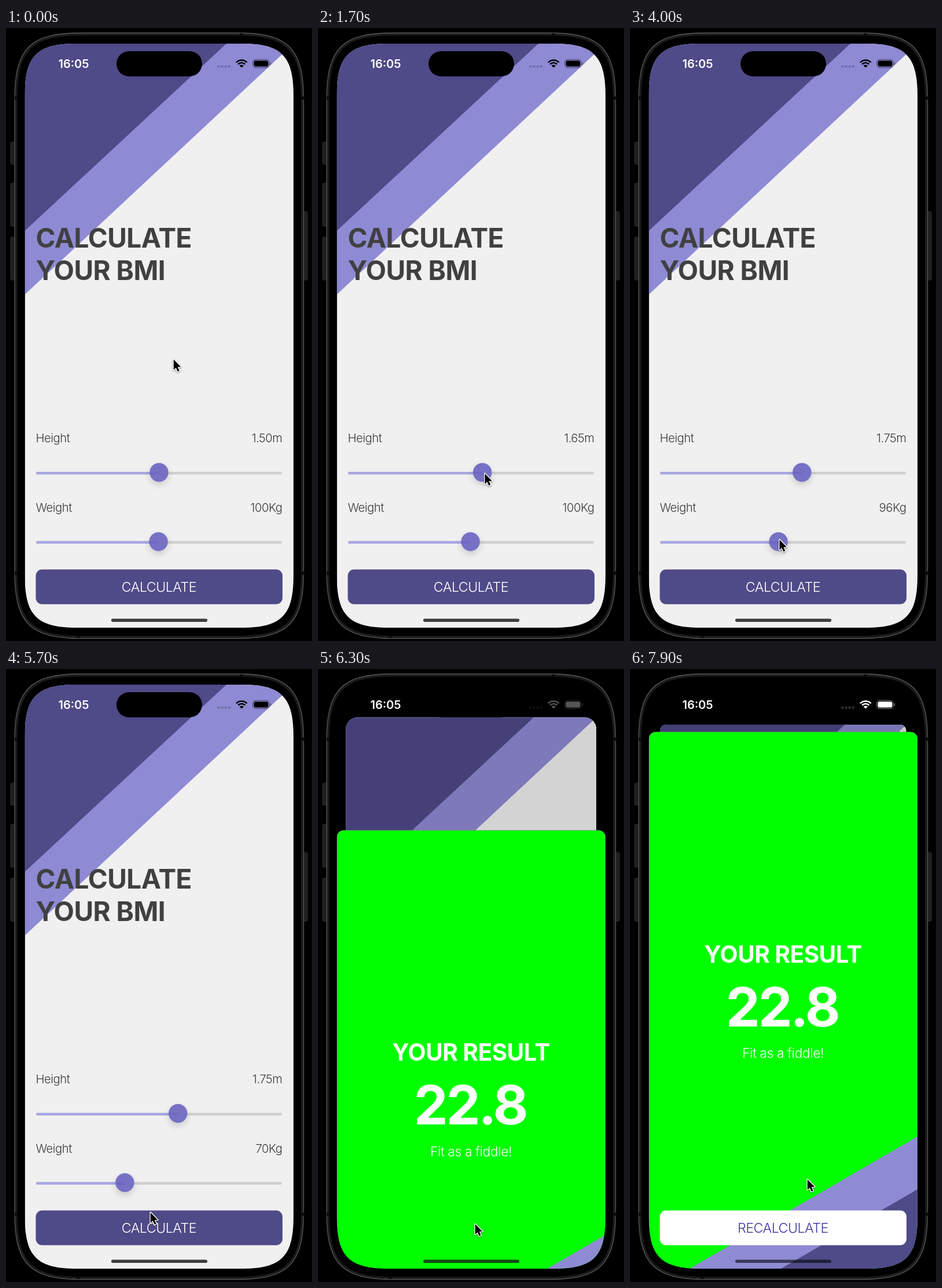
An HTML page with a canvas that plays this animation: 529 by 1058 pixels, repeating every 8 s.

```html
<!DOCTYPE html>
<html lang="en">
<head>
<meta charset="utf-8">
<title>BMI calculator</title>
<style>
html, body { margin: 0; width: 100%; height: 100%; overflow: hidden; background: #000; }
canvas { display: block; width: 100%; height: 100%; }
</style>
</head>
<body>
<canvas id="stage"></canvas>
<script>
const W = 529, H = 1058, LOOP = 8000, STEP = 100;
const MID = 264.7;
const SCREEN = { x: 32.5, y: 27, w: 464.5, h: 1008, r: 65 };
const DARK = '#4f4a88', LILAC = '#8e8ad4', PAPER = '#f0f0f0';
const KNOB_MID = 264.5, KNOB_TRAVEL = 394;

const canvas = document.getElementById('stage');
const ratio = window.devicePixelRatio || 1;
canvas.width = W * ratio;
canvas.height = H * ratio;
const ctx = canvas.getContext('2d');

// Pointer path: time, x, y
const POINTER = [
  [0, 289, 571], [500, 281, 668], [900, 267.9, 767], [1100, 267.9, 768],
  [1700, 287.6, 768], [2300, 294.5, 768], [2900, 298.8, 768], [3100, 300.7, 768],
  [3400, 300.7, 768], [3700, 264.6, 882], [4000, 257.6, 882], [5100, 206.4, 882],
  [5400, 206.4, 882], [5700, 249, 937], [5900, 271, 957], [6900, 271, 957],
  [7200, 277, 919], [7400, 317, 890], [7600, 307, 876], [7800, 307, 879], [7900, 306, 880]
];

const clamp = (v, lo, hi) => Math.min(hi, Math.max(lo, v));
const mix = (a, b, k) => a + (b - a) * k;

function pointerAt(t) {
  const i = POINTER.findIndex(p => p[0] >= t);
  if (i < 0) return POINTER[POINTER.length - 1].slice(1);
  if (i === 0) return POINTER[0].slice(1);
  const a = POINTER[i - 1], b = POINTER[i];
  const k = (t - a[0]) / (b[0] - a[0]);
  return [mix(a[1], b[1], k), mix(a[2], b[2], k)];
}

// Critically damped spring, 0 to 1
function sheetProgress(t) {
  const s = 17 * Math.max(0, t - 6117) / 1000;
  return 1 - (1 + s) * Math.exp(-s);
}

function box(x, y, w, h, r) {
  ctx.beginPath();
  ctx.roundRect(x, y, w, h, r);
}

// Rounded box whose corners ease into the sides
function smoothBox(x, y, w, h, r) {
  const e = r * 1.4, c = e * 0.224, right = x + w, bottom = y + h;
  ctx.beginPath();
  ctx.moveTo(x + e, y);
  ctx.lineTo(right - e, y);
  ctx.bezierCurveTo(right - c, y, right, y + c, right, y + e);
  ctx.lineTo(right, bottom - e);
  ctx.bezierCurveTo(right, bottom - c, right - c, bottom, right - e, bottom);
  ctx.lineTo(x + e, bottom);
  ctx.bezierCurveTo(x + c, bottom, x, bottom - c, x, bottom - e);
  ctx.lineTo(x, y + e);
  ctx.bezierCurveTo(x, y + c, x + c, y, x + e, y);
  ctx.closePath();
}

function fillBox(x, y, w, h, r, color) {
  box(x, y, w, h, r);
  ctx.fillStyle = color;
  ctx.fill();
}

function poly(color, ...pts) {
  ctx.beginPath();
  pts.forEach(([x, y]) => ctx.lineTo(x, y));
  ctx.closePath();
  ctx.fillStyle = color;
  ctx.fill();
}

function disc(x, y, r, color) {
  ctx.beginPath();
  ctx.arc(x, y, r, 0, Math.PI * 2);
  ctx.fillStyle = color;
  ctx.fill();
}

function text(str, x, y, size, weight, color, align = 'left', track = -0.025) {
  const gap = size * track;
  ctx.font = `${weight} ${size}px Inter, sans-serif`;
  ctx.letterSpacing = `${gap}px`;
  ctx.textAlign = align;
  ctx.fillStyle = color;
  // Trailing letter space would push centred text off its middle
  ctx.fillText(str, align === 'center' ? x + gap / 2 : x, y);
}

function drawBody() {
  ctx.fillStyle = '#000';
  ctx.fillRect(0, 0, W, H);
  for (const [x, y, h] of [[8, 197, 38], [8, 268, 74], [8, 361, 74], [513, 317, 118]]) {
    fillBox(x, y, 8, h, 2, '#1e1e1e');
    ctx.strokeStyle = '#303030';
    ctx.lineWidth = 1;
    ctx.stroke();
  }
  smoothBox(15, 8.5, 499.5, 1045, 83);
  ctx.fillStyle = '#1b1b1b';
  ctx.fill();
  ctx.strokeStyle = '#585858';
  ctx.lineWidth = 1.3;
  ctx.stroke();
  ctx.fillStyle = '#0c0c0c';
  for (const y of [118, 938]) {
    ctx.fillRect(15, y, 5, 6);
    ctx.fillRect(510, y, 5, 6);
  }
  ctx.fillRect(404, 9, 6, 5);
  ctx.fillRect(122, 1048, 6, 5);
  smoothBox(19.5, 13, 490.5, 1036, 79);
  ctx.fillStyle = '#000';
  ctx.fill();
}

function slider(y, x) {
  fillBox(52, y - 1, 425, 4.6, 2.3, '#cecfd0');
  fillBox(52, y - 1, x - 52, 4.6, 2.3, '#aaa6e4');
  ctx.save();
  ctx.shadowColor = 'rgba(0,0,0,.16)';
  ctx.shadowBlur = 12 * ratio;
  ctx.shadowOffsetY = 5 * ratio;
  disc(x, y, 16.2, '#7771c6');
  ctx.restore();
  ctx.fillStyle = 'rgba(90,82,180,.25)';
  ctx.fillRect(x - 15.5, y - 1, 15.5, 4.6);
}

function drawHome(t) {
  const { x, y, w, h } = SCREEN;
  ctx.fillStyle = PAPER;
  ctx.fillRect(x, y, w, h);
  poly(LILAC, [x, y], [497.4, y], [x, 460]);
  poly(DARK, [x, y], [381, y], [x, 350]);
  text('CALCULATE', 51.5, 379, 46, 700, '#404040', 'left', -0.012);
  text('YOUR BMI', 51.5, 435, 46, 700, '#404040', 'left', -0.012);

  const tall = pointerAt(clamp(t, 1100, 3100))[0] - 3.4;
  const heavy = pointerAt(clamp(t, 3700, 5100))[0] - 1;
  const part = px => 0.5 + (px - KNOB_MID) / KNOB_TRAVEL;
  const row = (label, value, base) => {
    text(label, 51.5, base, 20.3, 300, '#3c3c3c');
    text(value, 477.5, base, 20.3, 300, '#3c3c3c', 'right');
  };
  row('Height', (3 * part(tall)).toFixed(2) + 'm', 715);
  slider(767, tall);
  row('Weight', Math.round(200 * part(heavy)) + 'Kg', 835);
  slider(886.5, heavy);

  fillBox(51.5, 934.5, 426.5, 60, 11, DARK);
  text('CALCULATE', MID, 973, 23.3, 300, '#fff', 'center');
}

function drawPresenter(t, p) {
  const { x, y, w, h, r } = SCREEN;
  const scale = 1 - 0.083 * p;
  ctx.save();
  ctx.translate(MID, y + 69 * p);
  ctx.scale(scale, scale);
  ctx.translate(-MID, -y);
  box(x, y, w, h, mix(r, 12, p));
  ctx.clip();
  drawHome(t);
  ctx.fillStyle = `rgba(0,0,0,${0.148 * p})`;
  ctx.fillRect(x, y, w, h);
  ctx.restore();
}

function drawSheet(p) {
  const { x, w } = SCREEN, right = x + w, top = 108.4;
  ctx.save();
  ctx.translate(0, 927 * (1 - p));
  box(x, top, w, 940, [12, 12, 0, 0]);
  ctx.clip();
  ctx.fillStyle = '#00ff00';
  ctx.fillRect(x, top, w, 940);
  poly(LILAC, [right, 807], [right, 1048], [80.5, 1048]);
  poly(DARK, [right, 898], [right, 1048], [238.6, 1048]);
  text('YOUR RESULT', MID, 506.5, 40.6, 700, '#fff', 'center', -0.014);
  text('22.8', MID, 616.5, 94, 700, '#fff', 'center', -0.036);
  text('Fit as a fiddle!', MID, 671, 23, 300, '#fff', 'center', -0.02);
  fillBox(51.5, 934.5, 426.5, 60, 11, '#fff');
  text('RECALCULATE', MID, 973, 23.3, 300, '#3f37a8', 'center');
  box(x, top, w, 940, [12, 12, 0, 0]);
  ctx.strokeStyle = '#8a7f8a';
  ctx.lineWidth = 1;
  ctx.stroke();
  ctx.restore();
}

function drawStatus(k) {
  const c = Math.round(255 * k);
  const tint = a => `rgba(${c},${c},${c},${a})`;
  fillBox(191, 40, 148, 43.5, 21.75, '#000');
  text('16:05', 117, 68.7, 20, 600, '#fff', 'center', 0);
  for (let i = 0; i < 4; i++) disc(367.6 + 6.1 * i, 66.6, 2.2, tint(0.2));

  const cy = 68.6, from = -Math.PI * 0.75, to = -Math.PI * 0.25;
  ctx.strokeStyle = tint(1);
  ctx.lineWidth = 2.7;
  for (const r of [13.1, 8.6]) {
    ctx.beginPath();
    ctx.arc(407.3, cy, r, from, to);
    ctx.stroke();
  }
  ctx.beginPath();
  ctx.moveTo(407.3, cy);
  ctx.arc(407.3, cy, 5.2, from, to);
  ctx.fillStyle = tint(1);
  ctx.fill();

  box(426.6, 54.4, 28.6, 14, 4.6);
  ctx.strokeStyle = tint(0.42);
  ctx.lineWidth = 1.1;
  ctx.stroke();
  fillBox(428.4, 56.2, 25, 10.4, 3, tint(1));
  fillBox(456.4, 59.2, 1.7, 4.6, [0, 1.6, 1.6, 0], tint(0.45));
}

function drawIndicator(k) {
  const c = Math.round(mix(30, 0, k));
  fillBox(182, 1019.5, 166, 5.6, 2.8, `rgba(${c},${c},${c},${mix(0.85, 0.58, k)})`);
}

function drawPointer(x, y) {
  const pts = [[0, 0], [0, 17.2], [3.9, 13.6], [6.6, 20], [9.5, 18.8], [6.8, 12.5], [12, 12.2]];
  ctx.save();
  ctx.translate(x + 0.8, y + 1);
  ctx.scale(1.04, 1.04);
  ctx.lineJoin = 'round';
  ctx.shadowColor = 'rgba(0,0,0,.35)';
  ctx.shadowBlur = 3 * ratio;
  ctx.shadowOffsetY = 1.2 * ratio;
  poly('#fff', ...pts);
  ctx.strokeStyle = '#fff';
  ctx.lineWidth = 2.6;
  ctx.stroke();
  ctx.shadowColor = 'transparent';
  poly('#000', ...pts);
  ctx.restore();
}

function draw(t) {
  const p = sheetProgress(t);
  const k = clamp((t - 6200) / 300, 0, 1);
  const { x, y, w, h, r } = SCREEN;
  ctx.setTransform(ratio, 0, 0, ratio, 0, 0);
  drawBody();
  ctx.save();
  smoothBox(x, y, w, h, r);
  ctx.clip();
  drawPresenter(t, p);
  if (p > 0) drawSheet(p);
  ctx.restore();
  drawStatus(k);
  drawIndicator(k);
  drawPointer(...pointerAt(t));
}

const start = performance.now();
function tick() {
  const t = (performance.now() - start) % LOOP;
  draw(Math.floor(t / STEP) * STEP);
  requestAnimationFrame(tick);
}
tick();
</script>
</body>
</html>
```
